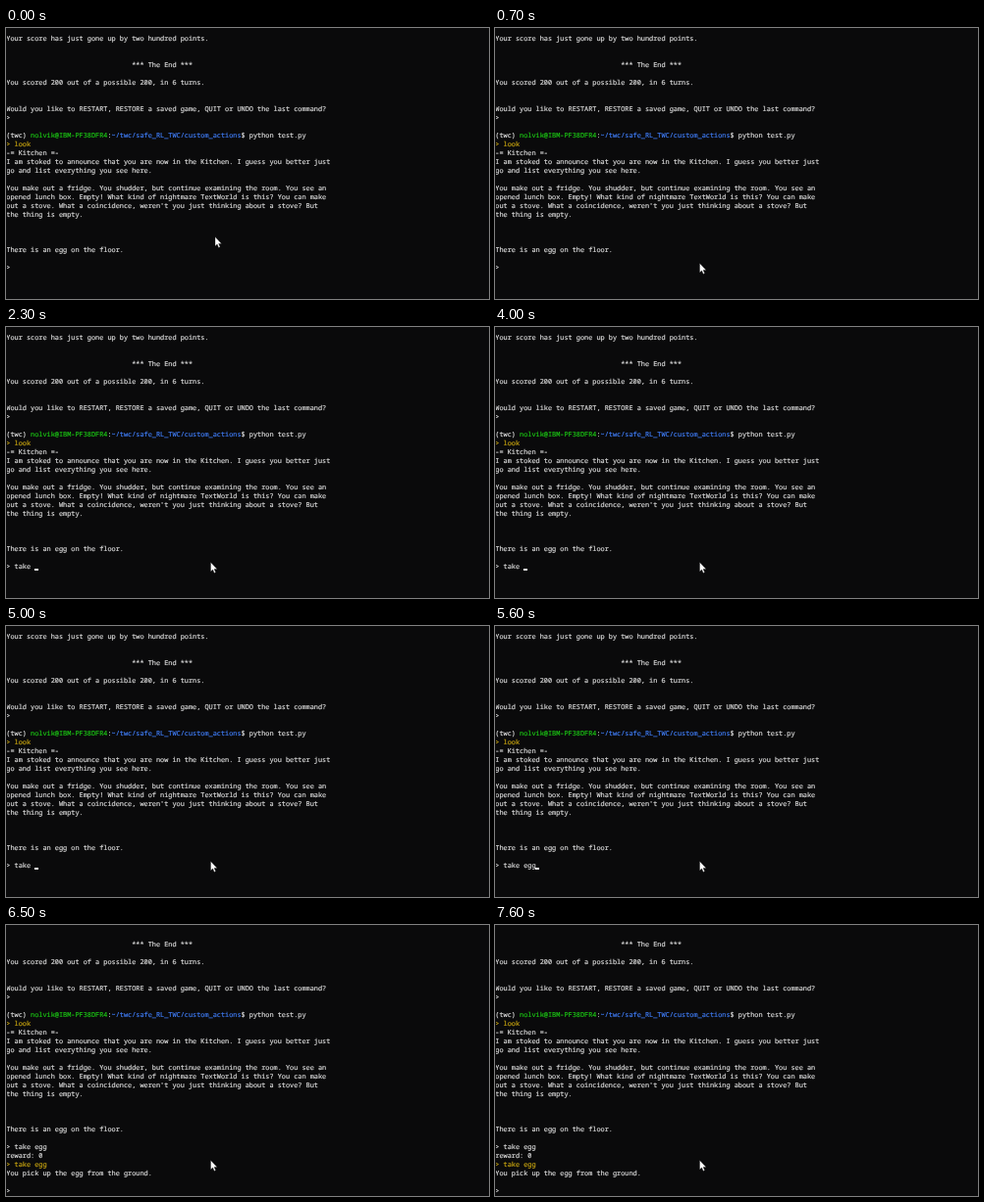
An HTML page that plays this animation: 492x277 px, repeating every 8 s.

```html
<!DOCTYPE html>
<html lang="en">
<head>
<meta charset="utf-8">
<title>Text adventure in a terminal</title>
<style>
  html, body { margin: 0; width: 100%; height: 100%; overflow: hidden; background: #0a0a0b; }
  #stage { position: relative; width: 492px; height: 277px; overflow: hidden; clip-path: inset(0 0 0 1px); }
  #screen {
    position: absolute; left: .3px; top: 7px; margin: 0; color: #dcdcdc;
    font: 6.88px/9px "Noto Sans Mono", "DejaVu Sans Mono", monospace;
    text-rendering: geometricPrecision; font-variant-ligatures: none;
    -webkit-text-stroke: .18px currentColor;
  }
  .user { color: #1bc414; }
  .path { color: #3f7cf5; }
  .echo { color: #c8a510; }
  #caret { position: absolute; width: 4.3px; height: 2px; background: #f4f4f4; }
  #mouse { position: absolute; left: 0; top: 0; }
</style>
</head>
<body>
<div id="stage">
<pre id="screen">Your score has just gone up by two hundred points.


                               *** The End ***

You scored 200 out of a possible 200, in 6 turns.


Would you like to RESTART, RESTORE a saved game, QUIT or UNDO the last command?
&gt;

(twc) <span class="user">nolvik@IBM-PF38DFR4</span>:<span class="path">~/twc/safe_RL_TWC/custom_actions</span>$ python test.py
<span class="echo">&gt; look</span>
-= Kitchen =-
I am stoked to announce that you are now in the Kitchen. I guess you better just
go and list everything you see here.

You make out a fridge. You shudder, but continue examining the room. You see an
opened lunch box. Empty! What kind of nightmare TextWorld is this? You can make
out a stove. What a coincidence, weren't you just thinking about a stove? But
the thing is empty.



There is an egg on the floor.

&gt; <span id="typed"></span><span id="reply">
reward: 0
<span class="echo">&gt; take egg</span>
You pick up the egg from the ground.

&gt;</span></pre>
<div id="caret"></div>
<svg id="mouse" width="9" height="13" viewBox="-1 -1 9 13">
  <path d="M0 0V9.4L2.1 7.5L3.6 10.9L5.1 10.2L3.6 7H6.6Z" fill="#fff" stroke="#000" stroke-width=".3"/>
</svg>
</div>
<script>
const LOOP = 8000, COLUMN = 4.128, ROW = 9, ENTER = 5800;
const command = 'take egg';
const keyTimes = [1300, 1400, 2000, 2200, 2300, 5200, 5300, 5600];
const caretFlips = [200, 700, 1300, 3400, 4000, 4400, 5000, 6500, 7100, 7600];

const [screenText, typed, reply, caret, mouse] =
  ['screen', 'typed', 'reply', 'caret', 'mouse'].map(id => document.getElementById(id));
const countPast = (times, t) => times.filter(time => time <= t).length;

function draw() {
  const t = performance.now() % LOOP;
  const entered = t >= ENTER;
  const length = countPast(keyTimes, t);

  typed.textContent = command.slice(0, length);
  reply.hidden = !entered;
  screenText.style.top = 7 - (entered ? 2 * ROW : 0) + 'px';

  caret.hidden = countPast(caretFlips, t) % 2 === 0;
  caret.style.left = (2 + (entered ? 0 : length)) * COLUMN - .2 + 'px';
  caret.style.top = (entered ? 274 : 247) + 'px';

  const [x, y] = t < 200 ? [213, 213.5] : [208.5, 240.5];
  mouse.style.transform = `translate(${x - 1}px, ${y - 1}px)`;
  requestAnimationFrame(draw);
}
draw();
</script>
</body>
</html>
```
